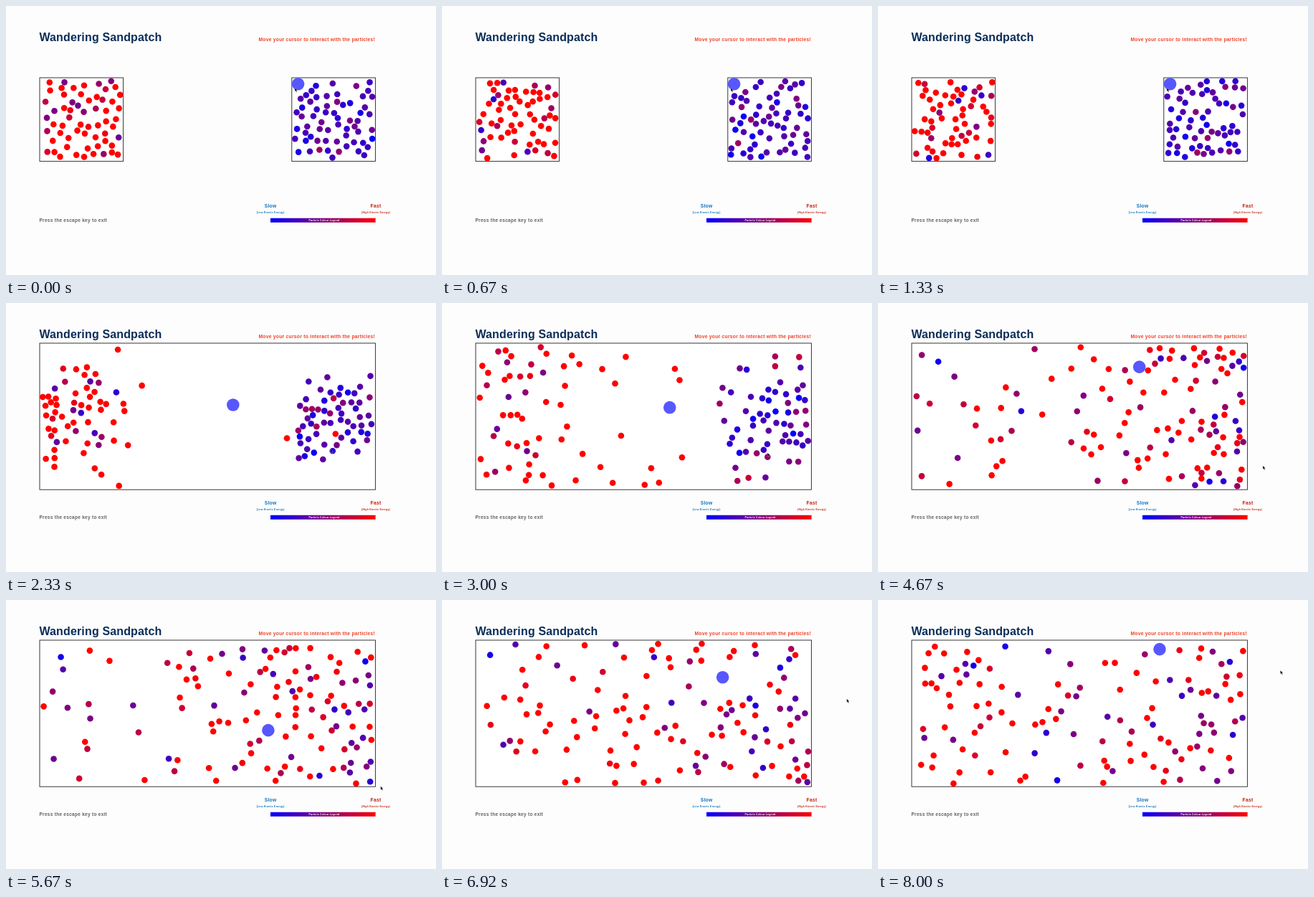
Animation, 600 px wide and 375 px high, one loop 8.08 s. Source, as an HTML page:

```html
<!DOCTYPE html>
<html lang="en">
<head>
<meta charset="utf-8">
<title>Wandering Sandpatch</title>
<style>
  html, body { margin: 0; width: 100%; height: 100%; overflow: hidden; background: #fdfdfd; }
  svg { display: block; width: 600px; height: 375px; }
  text { font: bold 6.7px "Liberation Sans", Arial, sans-serif; letter-spacing: .28px; }
  .mid { text-anchor: middle; }
  .small { font-size: 3.5px; letter-spacing: .21px; }
  .box { fill: #fff; stroke: #222; stroke-width: .9; }
  .slow { fill: #0a72c0; }
  .fast { fill: #c4200e; }
</style>
</head>
<body>
<svg viewBox="0 0 600 375">
  <defs>
    <linearGradient id="heat"><stop stop-color="#00f"/><stop offset="1" stop-color="#f00"/></linearGradient>
  </defs>
  <text x="46.4" y="48.5" fill="#0b2d59" style="font-size:16px;letter-spacing:.15px">Wandering Sandpatch</text>
  <text x="352.5" y="49" fill="#f03e24">Move your cursor to interact with the particles!</text>
  <text x="46.5" y="301" fill="#636363" style="font-size:6.5px">Press the escape key to exit</text>
  <text class="mid slow" x="369.1" y="281">Slow</text>
  <text class="mid small slow" x="369.1" y="288.5">(Low Kinetic Energy)</text>
  <text class="mid fast" x="516" y="281">Fast</text>
  <text class="mid small fast" x="516" y="288.5">(High Kinetic Energy)</text>
  <rect x="369" y="295.8" width="146.6" height="6" rx=".5" fill="url(#heat)"/>
  <text class="mid small" x="444" y="300.2" fill="#fff">Particle Colour Legend</text>
  <g id="closed">
    <rect class="box" x="47" y="100" width="116.6" height="116.4"/>
    <rect class="box" x="398.8" y="100" width="116.6" height="116.4"/>
  </g>
  <rect id="open" class="box" x="47" y="56" width="468.4" height="204.2"/>
  <g id="dots"></g>
  <circle id="ball" r="8.8" fill="#5757ff"/>
  <path id="cursor" d="M0 0V5.2L1.2 4.1 2.2 6.2 3.1 5.8 2.2 3.8H3.7Z" fill="#000" stroke="#fff" stroke-width=".3"/>
</svg>
<script>
const $ = id => document.getElementById(id);
const LOOP = 8080, FPS = 12, FRAMES = 97, SUB = 6, DT = 1 / FPS / SUB;
const RELEASE = 26 / FPS, R = 4.3, BIG = 8.8, RED_SPEED = 105, TOP_SPEED = 220;
const LEFT = [47, 100, 163.6, 216.4], RIGHT = [398.8, 100, 515.4, 216.4], WHOLE = [47, 56, 515.4, 260.2];

// cursor path: seconds, x, y
const PATH = [
  [0, 403, 114], [1.6, 403, 114], [2.2, 452.5, 202.5], [3.67, 455.5, 214],
  [4.25, 470, 195], [4.5, 505, 28], [4.75, 553, 326], [5, 527, 290],
  [5.5, 522.7, 259.5], [5.7, 522.7, 259.5], [6.3, 533, 236], [6.67, 549, 186],
  [6.92, 565, 137], [7.2, 566, 102], [7.5, 561.4, 98], [9, 561.4, 98]
];

let seed = 20;
function rand() {
  seed = (seed * 1664525 + 1013904223) % 4294967296;
  return seed / 4294967296;
}
const clamp = (v, lo, hi) => Math.min(hi, Math.max(lo, v));
const isOpen = t => t > RELEASE - DT / 2;

function cursorAt(t) {
  t = Math.max(0, t);
  const i = PATH.findIndex(p => p[0] > t);
  const [t0, x0, y0] = PATH[i - 1], [t1, x1, y1] = PATH[i];
  const k = (t - t0) / (t1 - t0);
  return { x: x0 + (x1 - x0) * k, y: y0 + (y1 - y0) * k };
}

// The ball trails the cursor at a reduced scale, kept inside its chamber
function ballAt(t) {
  const c = cursorAt(t - 1 / FPS), b = isOpen(t) ? WHOLE : RIGHT;
  return {
    x: clamp(c.x * .7, b[0] + BIG, b[2] - BIG),
    y: clamp(c.y * .7, b[1] + BIG, b[3] - BIG)
  };
}

const dots = [];
function fill(home, sigma, count) {
  const ball = ballAt(0);
  while (count) {
    const x = home[0] + R + rand() * (home[2] - home[0] - 2 * R);
    const y = home[1] + R + rand() * (home[3] - home[1] - 2 * R);
    if (Math.hypot(x - ball.x, y - ball.y) < R + BIG) continue;
    if (dots.some(d => Math.hypot(x - d.x, y - d.y) < 2 * R)) continue;
    const speed = sigma * Math.sqrt(-2 * Math.log(1 - rand())), a = rand() * 2 * Math.PI;
    dots.push({ x, y, vx: speed * Math.cos(a), vy: speed * Math.sin(a), home });
    count--;
  }
}

function bounceWalls(d, b) {
  if (d.x < b[0] + R) { d.x = b[0] + R; d.vx = Math.abs(d.vx); }
  if (d.x > b[2] - R) { d.x = b[2] - R; d.vx = -Math.abs(d.vx); }
  if (d.y < b[1] + R) { d.y = b[1] + R; d.vy = Math.abs(d.vy); }
  if (d.y > b[3] - R) { d.y = b[3] - R; d.vy = -Math.abs(d.vy); }
}

function collide(a, b) {
  const dx = b.x - a.x, dy = b.y - a.y, dist = Math.hypot(dx, dy);
  if (!dist || dist >= 2 * R) return;
  const nx = dx / dist, ny = dy / dist, gap = R - dist / 2;
  a.x -= nx * gap; a.y -= ny * gap;
  b.x += nx * gap; b.y += ny * gap;
  const p = (a.vx - b.vx) * nx + (a.vy - b.vy) * ny;
  if (p <= 0) return;
  a.vx -= p * nx; a.vy -= p * ny;
  b.vx += p * nx; b.vy += p * ny;
}

function hitBall(d, ball, ux, uy) {
  const dx = d.x - ball.x, dy = d.y - ball.y, dist = Math.hypot(dx, dy);
  if (!dist || dist >= R + BIG) return;
  const nx = dx / dist, ny = dy / dist;
  d.x = ball.x + nx * (R + BIG);
  d.y = ball.y + ny * (R + BIG);
  const p = (d.vx - ux) * nx + (d.vy - uy) * ny;
  if (p >= 0) return;
  d.vx -= 2 * p * nx;
  d.vy -= 2 * p * ny;
  const k = Math.min(1, TOP_SPEED / Math.hypot(d.vx, d.vy));
  d.vx *= k;
  d.vy *= k;
}

function step(t) {
  const open = isOpen(t), jump = open && !isOpen(t - DT);
  const ball = ballAt(t), last = ballAt(t - DT);
  const ux = jump ? 0 : (ball.x - last.x) / DT, uy = jump ? 0 : (ball.y - last.y) / DT;
  for (const d of dots) { d.x += d.vx * DT; d.y += d.vy * DT; }
  dots.forEach((a, i) => { for (let j = i + 1; j < dots.length; j++) collide(a, dots[j]); });
  for (const d of dots) {
    hitBall(d, ball, ux, uy);
    bounceWalls(d, open ? WHOLE : d.home);
  }
}

function snapshot() {
  return dots.map(d => {
    const heat = Math.round(255 * Math.min(1, Math.hypot(d.vx, d.vy) / RED_SPEED));
    return { x: d.x, y: d.y, color: `rgb(${heat},0,${255 - heat})` };
  });
}

fill(LEFT, 105, 60);
fill(RIGHT, 21, 62);
const frames = [snapshot()];
for (let n = 1; n < FRAMES * SUB; n++) {
  step(n * DT);
  if (n % SUB === 0) frames.push(snapshot());
}

const circles = dots.map(() => {
  const c = document.createElementNS("http://www.w3.org/2000/svg", "circle");
  c.setAttribute("r", R);
  return $("dots").appendChild(c);
});
function place(el, x, y) {
  el.setAttribute("transform", `translate(${x.toFixed(2)} ${y.toFixed(2)})`);
}

// Frame starts fall on whole hundredths of a second
function frameAt(ms) {
  const i = Math.floor((ms + 5) * FPS / 1000);
  return ms < Math.round(i * 100 / FPS) * 10 ? i - 1 : i;
}

function draw(now) {
  const f = frameAt(now % LOOP), t = f / FPS, open = isOpen(t);
  frames[f].forEach((d, i) => {
    place(circles[i], d.x, d.y);
    circles[i].setAttribute("fill", d.color);
  });
  $("closed").style.display = open ? "none" : "";
  $("open").style.display = open ? "" : "none";
  const ball = ballAt(t), c = cursorAt(t);
  place($("ball"), ball.x, ball.y);
  place($("cursor"), c.x, c.y);
}

const start = performance.now();
function tick() {
  draw(performance.now() - start);
  requestAnimationFrame(tick);
}
tick();
</script>
</body>
</html>
```
